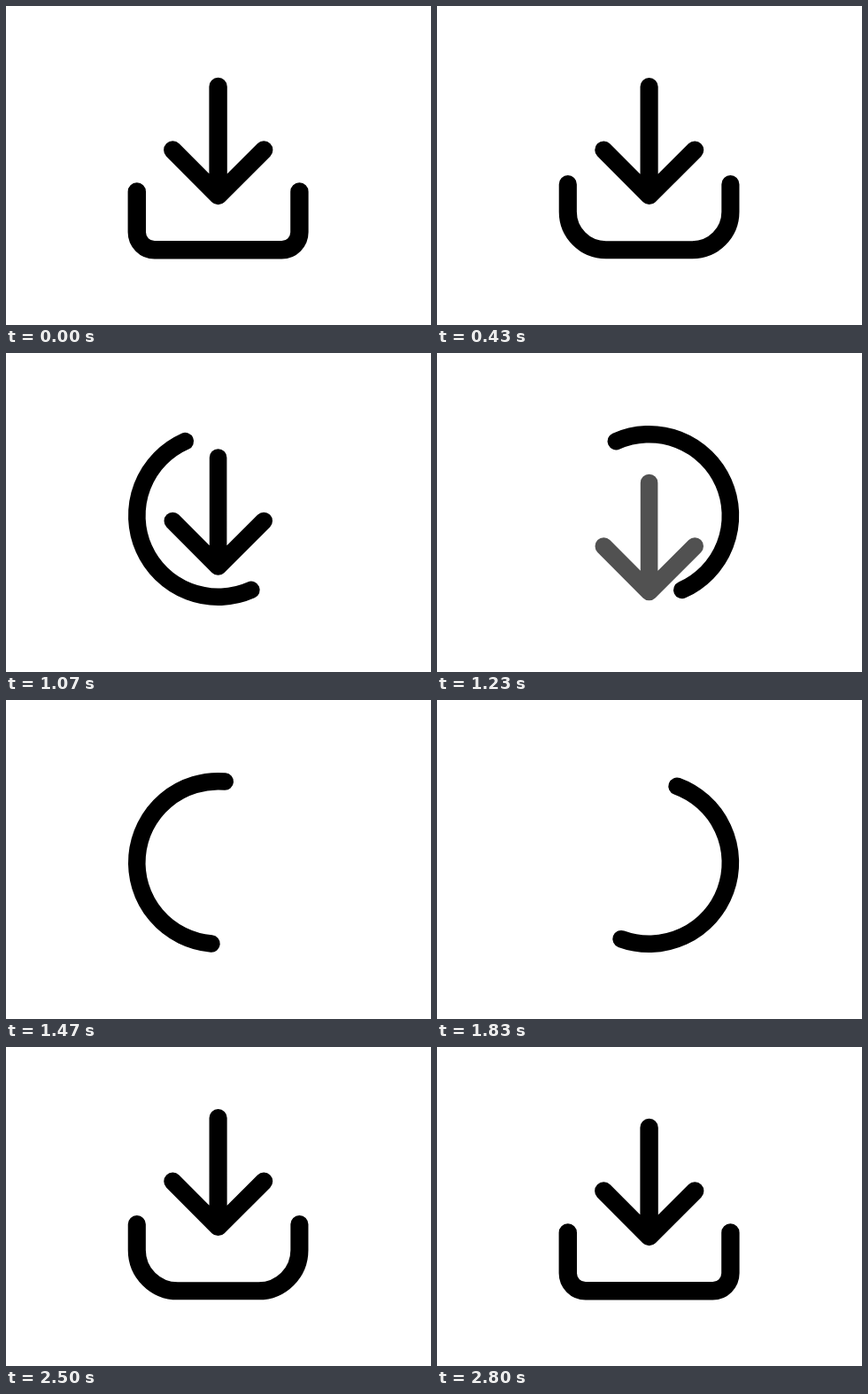
An HTML page for the animation above (3010 ms loop, 480 by 360 pixels).

```html
<!DOCTYPE html>
<html lang="en">
<head>
<meta charset="utf-8">
<title>Download icon</title>
<style>
  html, body { margin: 0; width: 100%; height: 100%; overflow: hidden; background: #fff; }
  svg { display: block; width: 480px; height: 360px; }
  path { fill: none; stroke: #000; stroke-linecap: round; stroke-linejoin: round; }
</style>
</head>
<body>
<svg viewBox="0 0 480 360">
  <path id="tray"/>
  <path id="arrow" d="M239.6 91V214M188.3 162.5L239.6 214L291.2 162.5"/>
</svg>
<script>
const LOOP = 3010, STEP = 100 / 3, LAST = 84;
const CX = 239.6, CY = 183.5, R = 91.8;
const tray = document.getElementById('tray');
const arrow = document.getElementById('arrow');

// Progress 0 to 1 between two steps along cubic-bezier(x1, 0, x2, 1).
function ease(step, from, to, x1 = 1 / 3, x2 = 2 / 3) {
  const x = (step - from) / (to - from);
  if (x <= 0) return 0;
  if (x >= 1) return 1;
  let low = 0, high = 1;
  for (let i = 0; i < 24; i++) {
    const s = (low + high) / 2, r = 1 - s;
    if (3 * s * r * r * x1 + 3 * s * s * r * x2 + s ** 3 < x) low = s;
    else high = s;
  }
  return low * low * (3 - 2 * low);
}

// A half circle turned by an angle in degrees.
function arcPath(turn) {
  const angle = turn * Math.PI / 180;
  const dx = R * Math.cos(angle), dy = R * Math.sin(angle);
  return `M${CX + dx} ${CY + dy}A${R} ${R} 0 0 1 ${CX - dx} ${CY - dy}`;
}

// An open box whose corners grow until it is a half circle.
function boxPath(round) {
  const r = 20 + (R - 20) * round, end = CY + 26 * (1 - round);
  const left = CX - R, right = CX + R, base = CY + R;
  return `M${right} ${end}V${base - r}A${r} ${r} 0 0 1 ${right - r} ${base}`
    + `H${left + r}A${r} ${r} 0 0 1 ${left} ${base - r}V${end}`;
}

function draw(time) {
  const step = Math.min(LAST, Math.floor((time % LOOP + 5) / STEP));
  const round = ease(step, 0, 29, .45, .74) - ease(step, 68, LAST, .2, .4);
  const turn = 720 * ease(step, 29.1, 68, .104, .346);
  const leave = 27 * ease(step, 15, 32, .3, .3) + 57 * ease(step, 32, 42);
  const enter = 30 * (ease(step, 68, LAST, .2, .4) - 1);
  const width = 20.4 - .8 * round;

  tray.setAttribute('d', turn > 0 && turn < 720 ? arcPath(turn) : boxPath(round));
  tray.setAttribute('stroke-width', width);
  arrow.setAttribute('stroke-width', width);
  arrow.setAttribute('transform', `translate(0 ${step < 60 ? leave : enter})`);
  arrow.setAttribute('opacity', 1 - ease(step, 34, 42) + ease(step, 68, 74));
}

const start = performance.now();
function tick() {
  draw(performance.now() - start);
  requestAnimationFrame(tick);
}
tick();
</script>
</body>
</html>
```
